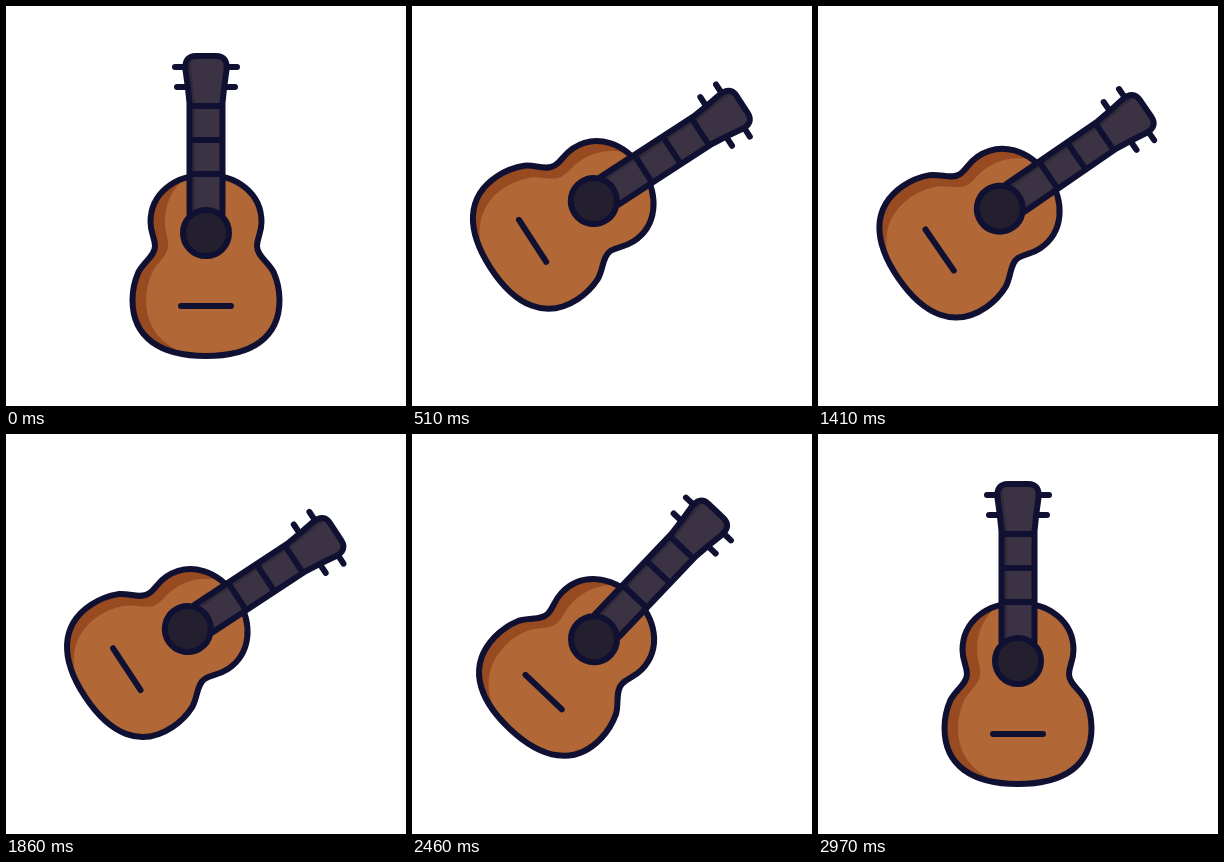
An HTML page that plays this animation: 400 by 400 pixels, repeating every 5 s.

```html
<!DOCTYPE html>
<html lang="en">
<head>
<meta charset="utf-8">
<title>Guitar</title>
<style>
  html, body { margin: 0; width: 100%; height: 100%; overflow: hidden; background: #fff; }
  svg { display: block; width: 100%; height: 100%; }
</style>
</head>
<body>
<svg viewBox="0 0 400 400">
  <defs>
    <path id="body" d="M200 169C168 169 144.500 188 144.500 216C144.500 227 149 232 149 240C149 250 138.500 255 132.500 266C128.500 275 126.500 284 126.500 294C126.500 332 155 350 200 350C245 350 273.500 332 273.500 294C273.500 284 271.500 275 267.500 266C261.500 255 251 250 251 240C251 232 255.500 227 255.500 216C255.500 188 232 169 200 169Z"/>
    <path id="neck" d="M183.500 208V97Q182 80 179.500 64Q178 50 190 50H210Q222 50 220.500 64Q218 80 216.500 97V208Z"/>
    <clipPath id="bodyClip"><use href="#body"/></clipPath>
    <clipPath id="neckClip"><use href="#neck"/></clipPath>
  </defs>
  <g id="guitar" fill="none" stroke="#101132" stroke-width="6" stroke-linecap="round" stroke-linejoin="round">
    <use href="#body" fill="#984a20" stroke="none"/>
    <path clip-path="url(#bodyClip)" fill="#b16836" stroke="none" d="M186 165C168 180 159 195 159 215C159 228 163 232 162 241C161 251 150 257 145.500 268C142 276 140 285 140 294C140 325 160 345 194 351H280V165Z"/>
    <use href="#body"/>
    <path d="M169 61H180M220 61H231M171 81H182M218 81H229"/>
    <use href="#neck" fill="#3b3243" stroke="none"/>
    <path clip-path="url(#neckClip)" fill="#312a3a" stroke="none" d="M176 45H187Q184 56 186 70L189 97V210H176Z"/>
    <use href="#neck"/>
    <path d="M184 100H216M184 134H216M184 168H216M175 300H225"/>
    <circle cx="200" cy="227" r="23" fill="#241f2e"/>
  </g>
</svg>
<script>
  const LOOP = 5000, STEP = 30, END = 2970, STRUM = 2000 / 3;
  const REST = { x: 200, y: 227 };
  const guitar = document.getElementById('guitar');

  const mix = (a, b, k) => a + (b - a) * k;
  const ease = (t, from, to) => {
    const k = Math.min(1, Math.max(0, (t - from) / (to - from)));
    return (1 - Math.cos(Math.PI * k)) / 2;
  };
  const wave = (t, peak) => Math.cos(2 * Math.PI * (t - peak) / STRUM);

  // Lean right, strum in a small loop, swing back past upright, settle.
  function pose(t) {
    const s = Math.min(t, 2190);
    const strumY = 200 - 5 * wave(s, 1850);
    const strumAngle = 57.1 + 2.1 * wave(s, 1670);
    const lean = ease(t, 0, 490);
    const place = lean * (1 - ease(t, 2440, 2740));
    let angle = mix(strumAngle * lean, -10, ease(t, 2340, 2740));
    angle *= 1 - ease(t, 2740, END);
    return { x: mix(REST.x, 181.8, place), y: mix(REST.y, strumY, place), angle };
  }

  function draw(ms) {
    const t = Math.min(END, Math.floor(ms / STEP) * STEP);
    const p = pose(t);
    guitar.setAttribute('transform',
      `translate(${p.x} ${p.y}) rotate(${p.angle}) translate(${-REST.x} ${-REST.y})`);
  }

  const start = performance.now();
  function tick() {
    draw((performance.now() - start) % LOOP);
    requestAnimationFrame(tick);
  }
  tick();
</script>
</body>
</html>
```
